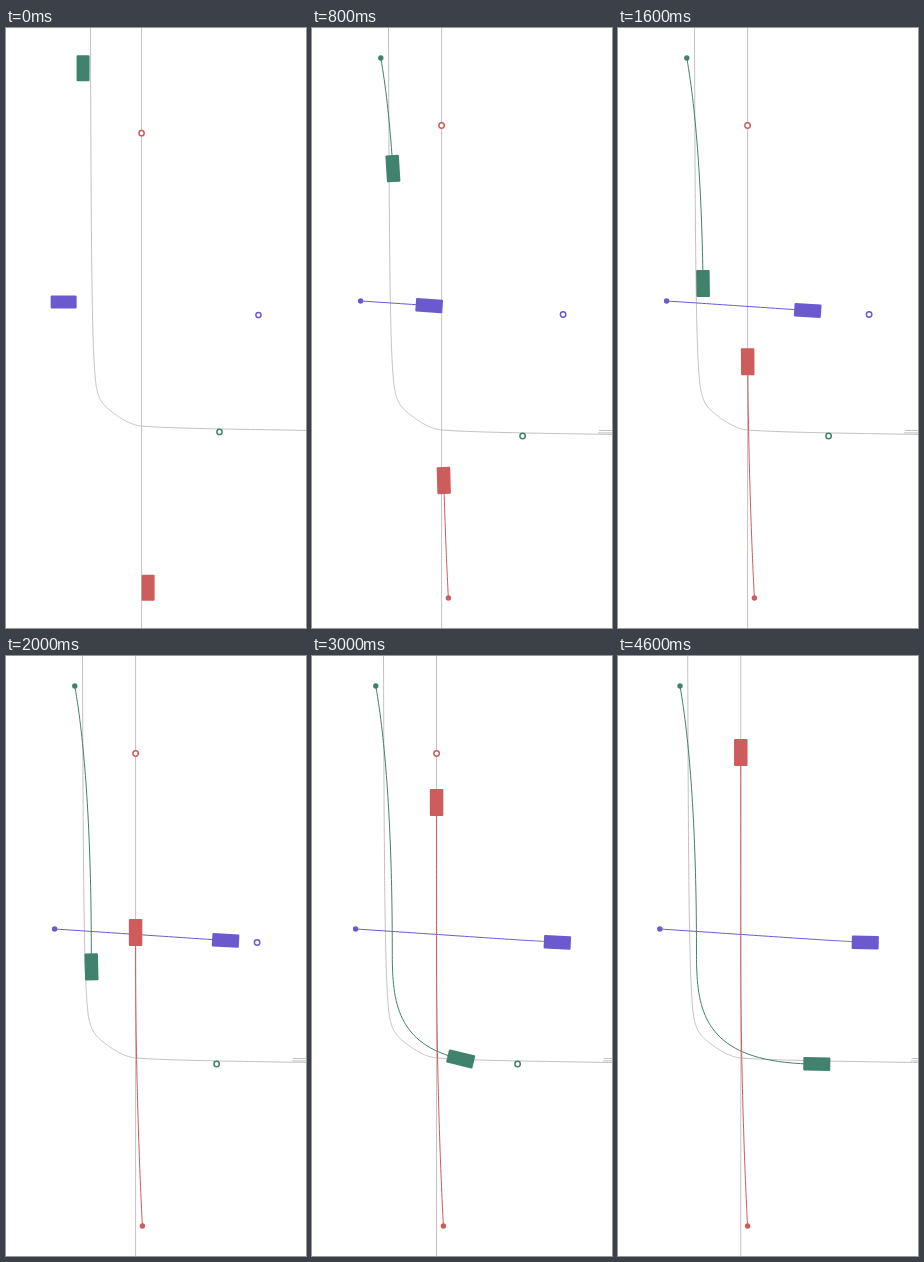
Animation, 300 px wide and 600 px high, one loop 5000 ms. Source, as an HTML page with a canvas:

```html
<!DOCTYPE html>
<html lang="en">
<head>
<meta charset="utf-8">
<title>Three cars crossing</title>
<style>
html, body { margin: 0; width: 100%; height: 100%; overflow: hidden; background: #fff; }
canvas { display: block; width: 300px; height: 600px; }
</style>
</head>
<body>
<canvas id="stage" width="300" height="600"></canvas>
<script>
const W = 300, H = 600, LOOP = 5000, TICK = 100, LAST = 46;
const CAR_L = 27, CAR_W = 13.5, DOT_R = 2.7;
const GRAY = '#c2c2c2';
const ctx = document.getElementById('stage').getContext('2d');

// Polyline with running length along chained cubic curves.
function curve(start, ...cubics) {
  const out = [{ x: start[0], y: start[1], s: 0 }];
  let [x0, y0] = start;
  const mix = (a, b, c, d, u) => {
    const v = 1 - u;
    return a * v * v * v + 3 * b * v * v * u + 3 * c * v * u * u + d * u * u * u;
  };
  for (const [x1, y1, x2, y2, x3, y3] of cubics) {
    for (let k = 1; k <= 40; k++) {
      const x = mix(x0, x1, x2, x3, k / 40), y = mix(y0, y1, y2, y3, k / 40);
      const p = out[out.length - 1];
      out.push({ x, y, s: p.s + Math.hypot(x - p.x, y - p.y) });
    }
    x0 = x3;
    y0 = y3;
  }
  return out;
}

// Point and heading at length s.
function at(path, s) {
  let i = 1;
  while (i < path.length - 1 && path[i].s < s) i++;
  const a = path[i - 1], b = path[i], u = (s - a.s) / (b.s - a.s);
  return { x: a.x + (b.x - a.x) * u, y: a.y + (b.y - a.y) * u,
           a: Math.atan2(b.y - a.y, b.x - a.x), i };
}

// Slow start, slightly falling speed, then a soft stop at the path's end.
function travelled(car, n) {
  if (n === 0) return 0;
  const end = car.path[car.path.length - 1].s;
  const free = car.speed * n - 0.044 * n * n - car.lag * (1 - Math.exp(-n / 1.5));
  return end * (1 + (free / end) ** -car.brake) ** (-1 / car.brake);
}

const cars = [
  { color: '#40826d', goal: [210.5, 408], first: Math.PI / 2,
    speed: 15.44, lag: 9.5, brake: 14,
    path: curve([68.7, 30], [81, 100, 85.2, 200, 85.2, 295], [85.2, 352, 88.5, 408, 206.2, 408]) },
  { color: '#6a5acd', goal: [251, 286.5], first: 0,
    speed: 10.26, lag: 10.6, brake: 8,
    path: curve([48.5, 273], [110, 277, 205, 283.7, 225, 284.7], [240, 285.5, 245, 286.3, 254.2, 286.5]) },
  { color: '#cd5c5c', goal: [129.5, 97.5], first: -Math.PI / 2,
    speed: 15.9, lag: 6.8, brake: 14,
    path: curve([136.3, 570], [132.6, 500, 129.5, 400, 129.5, 300], [129.5, 232, 129.5, 164, 129.5, 96]) }
];

const bend = curve([76.3, -30],
  [76.8, 100, 77, 200, 78.2, 270], [78.9, 310, 79.6, 330, 81.2, 350],
  [83, 373, 88, 379, 98.8, 387.3], [109, 395, 119, 401, 130, 402],
  [165, 404.8, 260, 405.6, 320, 406.8]);

// View that holds all cars, starts and goals with an even margin.
function fit(poses, started) {
  let x0 = Infinity, x1 = -Infinity, y0 = Infinity, y1 = -Infinity;
  const add = (x, y, rx, ry) => {
    x0 = Math.min(x0, x - rx); x1 = Math.max(x1, x + rx);
    y0 = Math.min(y0, y - ry); y1 = Math.max(y1, y + ry);
  };
  cars.forEach((car, i) => {
    const p = poses[i], c = Math.abs(Math.cos(p.a)), s = Math.abs(Math.sin(p.a));
    add(p.x, p.y, (CAR_L * c + CAR_W * s) / 2, (CAR_L * s + CAR_W * c) / 2);
    add(...car.goal, DOT_R + 0.3, DOT_R + 0.3);
    if (started) add(car.path[0].x, car.path[0].y, DOT_R, DOT_R);
  });
  const k = H * (20 / 22) / (y1 - y0), cx = (x0 + x1) / 2, cy = (y0 + y1) / 2;
  return { k, cx, x: x => (x - cx) * k + W / 2, y: y => (y - cy) * k + H / 2 };
}

function line(pts, color) {
  ctx.beginPath();
  pts.forEach(p => ctx.lineTo(...p));
  ctx.strokeStyle = color;
  ctx.lineWidth = 1;
  ctx.stroke();
}

function disc(x, y, r, fill) {
  ctx.beginPath();
  ctx.arc(x, y, r, 0, 2 * Math.PI);
  ctx.fillStyle = fill;
  ctx.fill();
}

function draw(n) {
  const started = n > 0;
  const poses = cars.map(car => {
    const p = at(car.path, travelled(car, n));
    if (!started) p.a = car.first;
    return p;
  });
  const v = fit(poses, started);
  const map = p => [v.x(p.x), v.y(p.y)];

  ctx.fillStyle = '#fff';
  ctx.fillRect(0, 0, W, H);
  ctx.lineJoin = 'round';

  const mid = v.x(129.5);
  line([[mid, 0], [mid, H]], GRAY);
  line(bend.map(map), GRAY);
  if (started) {
    const edge = 287 + v.cx - 149.9;
    line([[edge, 402.5], [W, 402.5]], GRAY);
    line([[edge - 1, 404.9], [W, 404.9]], GRAY);
  }

  cars.forEach((car, i) => {
    const p = poses[i], [gx, gy] = car.goal;
    if (started) {
      line([...car.path.slice(0, p.i), p].map(map), car.color);
      disc(...map(car.path[0]), DOT_R * v.k, car.color);
    }
    disc(v.x(gx), v.y(gy), DOT_R * v.k, '#fff');
    ctx.strokeStyle = car.color;
    ctx.lineWidth = 1.5;
    ctx.stroke();
  });

  cars.forEach((car, i) => {
    const p = poses[i], l = CAR_L * v.k, w = CAR_W * v.k;
    ctx.save();
    ctx.translate(...map(p));
    ctx.rotate(p.a);
    ctx.beginPath();
    ctx.roundRect(-l / 2, -w / 2, l, w, 1);
    ctx.fillStyle = car.color;
    ctx.fill();
    ctx.restore();
  });
}

function frame() {
  draw(Math.min(LAST, Math.floor(performance.now() % LOOP / TICK)));
  requestAnimationFrame(frame);
}
frame();
</script>
</body>
</html>
```
